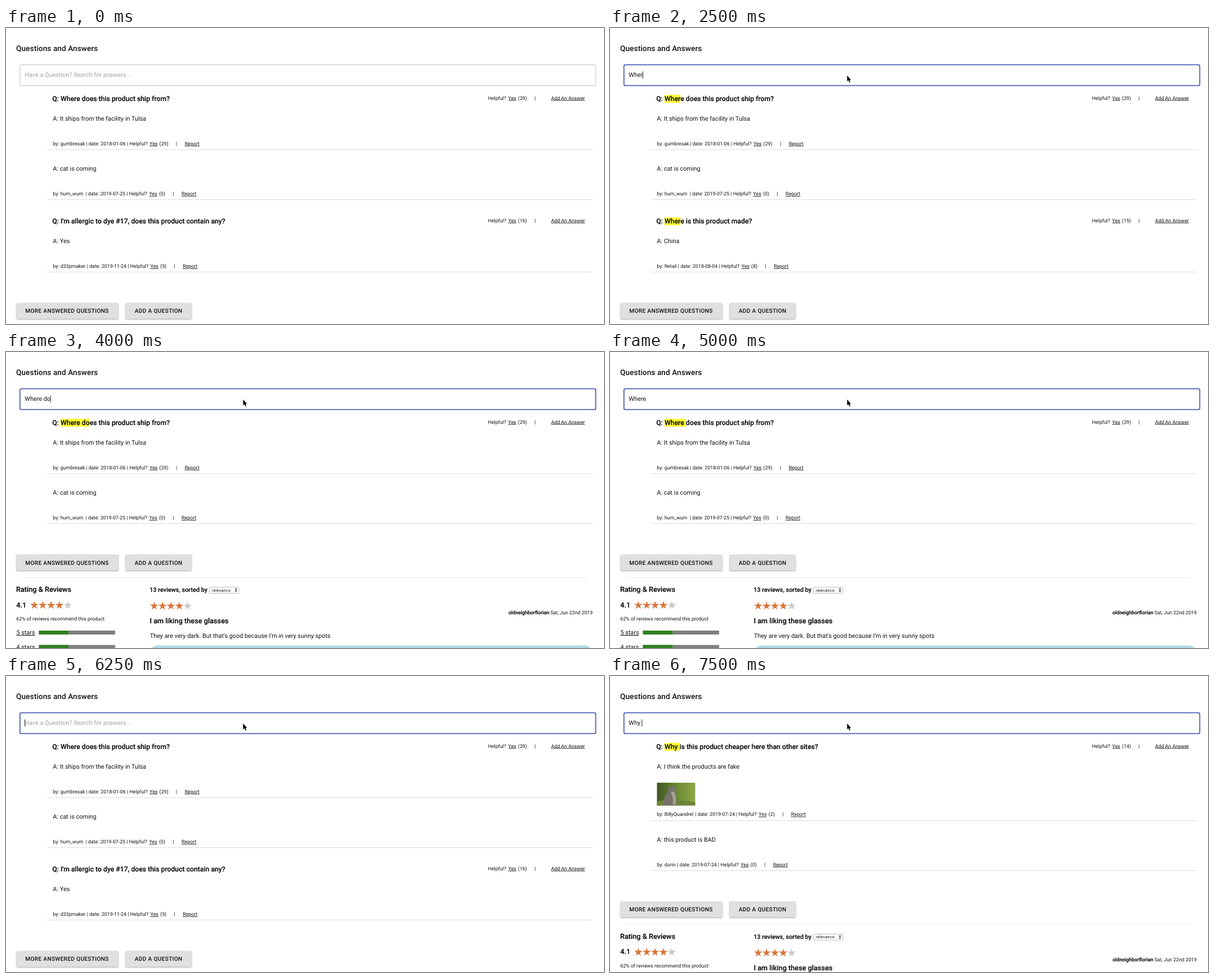
Write an HTML page that moves like this. It is 1063 px wide and 527 px high and loops after 8000 ms.

```html
<!DOCTYPE html>
<html lang="en">
<head>
<meta charset="utf-8">
<title>Questions and Answers</title>
<style>
  html, body { margin: 0; width: 100%; height: 100%; overflow: hidden; background: #fff; }
  svg { display: block; }
  text { font: 10.86px Roboto, sans-serif; fill: #111; white-space: pre; text-rendering: geometricPrecision; }
  .title { font-size: 13.58px; font-weight: 500; letter-spacing: .0075em; }
  .strong { font-weight: 500; stroke: #111; stroke-width: .22px; }
  .question { font-size: 12.22px; }
  .head { font-size: 12.71px; }
  .small { font-size: 8.82px; }
  .button { font-size: 10.18px; font-weight: 500; letter-spacing: .02857em; }
  .hint { fill: #a2a2a2; }
  .select { font: 7.2px Inter, sans-serif; }
  .link { text-decoration: underline; }
  .raised { fill: #e0e0e0; filter: drop-shadow(0 1px 1px rgba(0, 0, 0, .36)); }
</style>
</head>
<body>
<svg id="stage" width="1063" height="527" viewBox="0 0 1063 527">
  <defs>
    <linearGradient id="leaves">
      <stop offset="0" stop-color="#3f5424"/>
      <stop offset=".45" stop-color="#66862f"/>
      <stop offset="1" stop-color="#8fa848"/>
    </linearGradient>
  </defs>
  <g id="page"></g>
</svg>
<script>
const LOOP = 8000;
const page = document.getElementById('page');
const ruler = document.createElement('canvas').getContext('2d');

// Answers: text, author, x of the date part, date, votes, photo
const shipping = {
  text: 'Where does this product ship from?', votes: 29,
  answers: [
    ['It ships from the facility in Tulsa', 'gumbresak', 142.3, '2018-01-06', 29],
    ['cat is coming', 'hum_wum', 141.7, '2019-07-25', 0]
  ]
};
const allergy = {
  text: "I'm allergic to dye #17, does this product contain any?", votes: 16,
  answers: [['Yes', 'd33pmaker', 143.8, '2019-11-24', 5]]
};
const origin = {
  text: 'Where is this product made?', votes: 15,
  answers: [['China', 'Retail', 120.8, '2018-08-04', 8]]
};
const price = {
  text: 'Why is this product cheaper here than other sites?', votes: 14,
  answers: [
    ['I think the products are fake', 'BillyQuandrel', 151.4, '2019-07-24', 2, true],
    ['this product is BAD', 'dorin', 119.35, '2019-07-24', 0]
  ]
};
const all = [shipping, allergy], where = [shipping, origin], ship = [shipping], why = [price];

// Start time, typed text, caret shown, listed questions
const steps = [
  [0, '', false, all],
  [1000, '', true, all],
  [2000, 'W', true, all],
  [2250, 'Wh', true, all],
  [2500, 'Wher', true, where],
  [3000, 'Where', true, where],
  [3250, 'Where ', true, where],
  [3750, 'Where ', false, where],
  [4000, 'Where do', true, ship],
  [4250, 'Where does', true, ship],
  [4500, 'Where doe', true, ship],
  [4750, 'Where d', false, ship],
  [5000, 'Where ', false, ship],
  [5250, 'Wher', true, ship],
  [5750, 'Wh', false, ship],
  [6000, '', false, ship],
  [6250, '', true, all],
  [6750, 'W', true, all],
  [7000, 'Wh', true, all],
  [7250, 'Why', true, all],
  [7500, 'Why ', true, why]
];
// Start time and pointer tip
const moves = [[0], [250, 520.6, 31.4], [500, 448.5, 63.7], [750, 421.5, 84.5]];

const latest = (list, time) => list.findLast(item => item[0] <= time);

function width(string, size, weight) {
  ruler.font = `${weight} 100px Roboto, sans-serif`;
  return ruler.measureText(string).width * size / 100;
}

const text = (x, y, style, content, extra = '') =>
  `<text x="${x}" y="${y}" class="${style}" ${extra}>${content}</text>`;

const rect = (x, y, w, h, fill, extra = '') =>
  `<rect x="${x}" y="${y}" width="${w}" height="${h}" fill="${fill}" ${extra}/>`;

const votes = (count, gap, link) =>
  `Helpful?<tspan dx="3.6" class="link">Yes</tspan><tspan dx="3.2">(${count})</tspan>` +
  `<tspan dx="13.4">|</tspan><tspan dx="${gap}" class="link">${link}</tspan>`;

function photo(y) {
  return `<g transform="translate(83.5 ${y})">` +
    rect(0, 0, 68, 40.5, 'url(#leaves)') +
    '<path d="M0 33Q34 27 68 35V40.5H0Z" fill="#6d8438"/>' +
    '<path d="M12 40Q10 25 20 17L20 6L24 8L29 5Q35 9 31 15Q37 28 34 40Z" fill="#77736a"/>' +
    '<path d="M24 17Q30 26 28 39L33 39Q36 26 30 15Z" fill="#a5a093"/></g>';
}

function question(item, y, query) {
  const lead = 'Q: ', size = 12.22, x = 82.2;
  const at = query ? item.text.toLowerCase().indexOf(query.toLowerCase()) : -1;
  let mark = '';
  if (at >= 0) {
    const from = width(lead + item.text.slice(0, at), size, 500);
    const to = width(lead + item.text.slice(0, at + query.length), size, 500);
    mark = rect(x + from, y + 118.9, to - from, 14.2, '#ffff36');
  }
  return mark + text(x, y + 130.2, 'strong question', lead + item.text) +
    text(856.8, y + 127.5, 'small', votes(item.votes, 27.3, 'Add An Answer'));
}

function answer([reply, author, dateX, date, count], y, drop) {
  const base = y + drop + 208.7;
  return text(83.3, y + 165, '', 'A: ' + reply) +
    (drop ? photo(y + 190) : '') +
    text(83.3, base, 'small', 'by: ' + author) +
    text(dateX, base, 'small', `| date: ${date} | ` + votes(count, 13.5, 'Report')) +
    rect(73, Math.floor(y + drop + 216.4), 969.5, 1, '#dcdcdc');
}

function stars(x, y) {
  let out = '';
  for (let i = 0; i < 5; i++) {
    const points = Array.from({ length: 10 }, (_, k) => {
      const r = k % 2 ? 3 : 7.8, a = k * Math.PI / 5;
      return `${x + i * 14.85 + r * Math.sin(a)},${y - r * Math.cos(a)}`;
    });
    out += `<polygon points="${points.join(' ')}" fill="${i < 4 ? '#d9763d' : '#c9c9c9'}"/>`;
  }
  return out;
}

const button = (x, w, textX, label) =>
  rect(x, 360.5, w, 28.4, '#e0e0e0', 'rx="2.7" class="raised"') +
  text(textX, 378.5, 'button', label);

const scoreRow = (label, y) =>
  text(18.4, y, 'link', label) +
  rect(58.5, y - 7, 135.5, 7, '#808080') + rect(58.5, y - 7, 52.5, 7, '#2f801f');

function reviews(y) {
  return `<g transform="translate(0 ${y})">` +
    button(18.5, 181.3, 34.3, 'MORE ANSWERED QUESTIONS') +
    button(212.4, 117.6, 228.8, 'ADD A QUESTION') +
    rect(29, 401, 1003, 1, '#e6e6e6') +
    text(18, 427.2, 'strong head', 'Rating &amp; Reviews') +
    text(18.2, 454.5, 'strong head', '4.1') +
    stars(50.4, 451) +
    text(18.2, 478.2, 'small', '62% of reviews recommend this product') +
    scoreRow('5 stars', 503) + scoreRow('4 stars', 528.6) +
    text(255.3, 427.2, 'strong', '13 reviews, sorted by') +
    rect(361.3, 418.8, 52.8, 10.7, '#fff', 'rx="2.5" stroke="#a8a8a8" stroke-width=".8"') +
    text(366, 426.8, 'select', 'relevance') +
    '<path d="M406.8 423.3l2-2.8 2 2.8zM406.8 424.7l2 2.8 2-2.8z" fill="#222"/>' +
    stars(263.4, 452.3) +
    text(965.6, 467, 'strong small', 'oldneighborflorian', 'text-anchor="end"') +
    text(967.7, 467, 'small', 'Sat, Jun 22nd 2019') +
    text(255.4, 483.4, 'strong head', 'I am liking these glasses') +
    text(255.7, 509, '', "They are very dark. But that's good because I'm in very sunny spots") +
    rect(256, 522.5, 786.5, 60, '#b0d9e4', 'rx="14"') + '</g>';
}

function searchBox(query, caret, focused) {
  const x = 33.3;
  const border = focused ? 'stroke="#3347a9" stroke-width="1.5"' : 'stroke="#c0c0c0" stroke-width="1"';
  return rect(24.8, 65.4, 1023.6, 37.2, 'none', `rx="2.4" ${border}`) +
    (query ? text(x, 87.4, '', query) : text(x, 87.4, 'hint', 'Have a Question? Search for answers....')) +
    (caret ? rect(x + width(query, 10.86, 400) - .3, 77.3, .9, 12.7, '#111') : '');
}

const pointer = (x, y) =>
  `<path transform="translate(${x} ${y})" d="M0 0V10.8L2.4 8.6L4 12.5L5.7 11.8L4.1 8H7Z"
    fill="#000" stroke="#fff" stroke-width=".8" paint-order="stroke"/>`;

function render(time) {
  const [, query, caret, list] = latest(steps, time);
  const [, px, py] = latest(moves, time);
  let y = 0;
  let out = text(18, 40.7, 'title', 'Questions and Answers') + searchBox(query, caret, time >= 1000);
  for (const item of list) {
    out += question(item, y, query);
    for (const reply of item.answers) {
      const drop = reply[5] ? 40.7 : 0;
      out += answer(reply, y, drop);
      y += 89.3 + drop;
    }
    y += 39.6;
  }
  out += reviews(y - 218.2);
  return px ? out + pointer(px, py) : out;
}

const start = performance.now();
let shown = '';
function tick() {
  const next = render((performance.now() - start) % LOOP);
  if (next !== shown) page.innerHTML = shown = next;
  requestAnimationFrame(tick);
}
tick();
</script>
</body>
</html>
```
